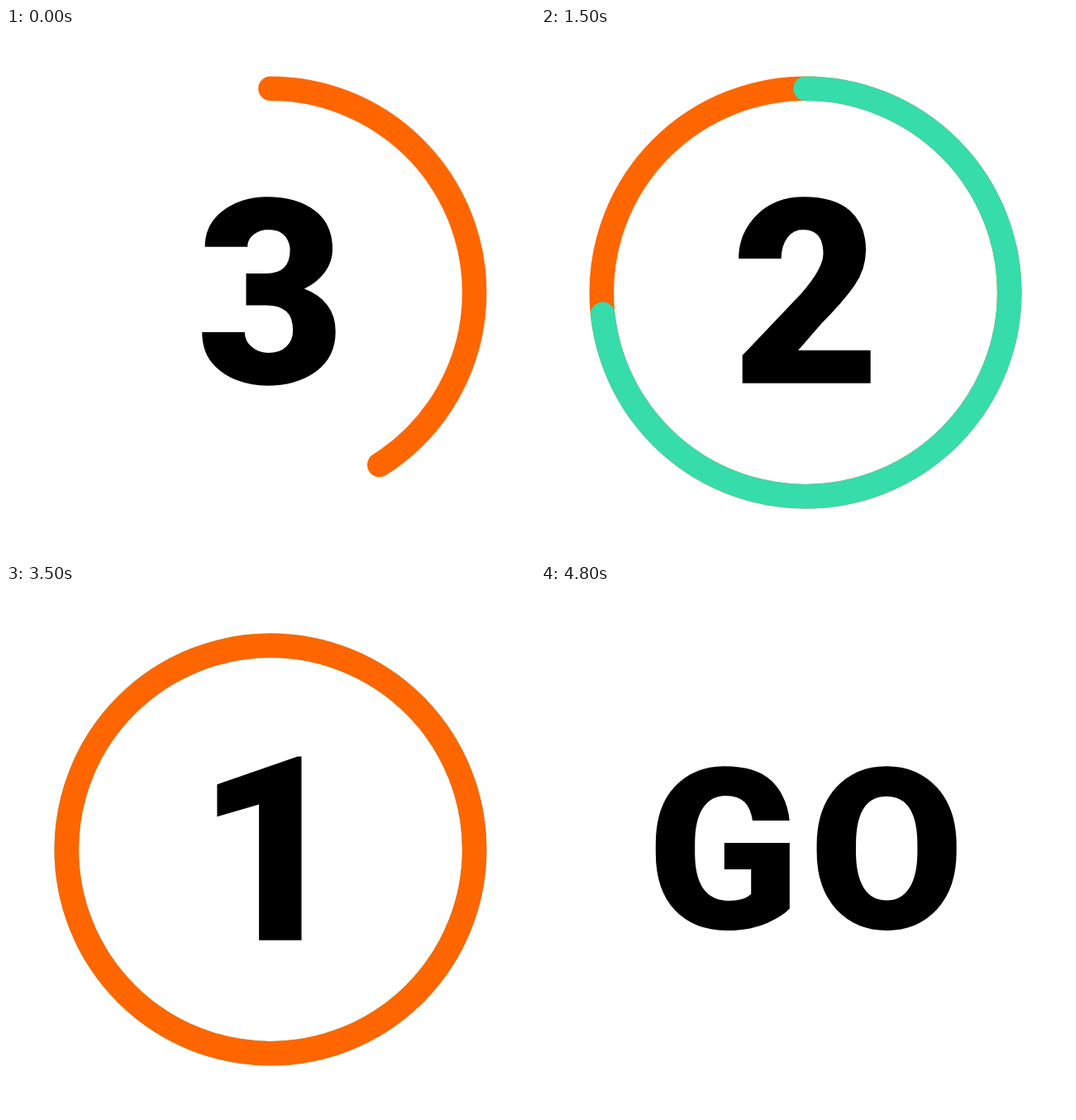
These frames come from a looping animation (640 px wide and 640 px high, 6000 ms). An HTML page:

```html
<!DOCTYPE html>
<html lang="en">
<head>
<meta charset="utf-8">
<title>Countdown</title>
<style>
  html, body { margin: 0; width: 100%; height: 100%; overflow: hidden; background: #fff; }
  svg { display: block; width: 100vw; height: 100vh; }
  circle { fill: none; stroke-width: 29.6; stroke-linecap: round; }
  text { font-family: Roboto, Arial, sans-serif; font-weight: 900; text-anchor: middle; }
</style>
</head>
<body>
<svg viewBox="0 0 640 640">
  <g transform="rotate(-90 320 320)">
    <circle id="under" cx="320" cy="320" r="246.7"/>
    <circle id="sweep" cx="320" cy="320" r="246.7" pathLength="360"/>
  </g>
  <text id="label"></text>
</svg>
<script>
  const LOOP = 6000, STEP = 100, STEPS = 12;
  const ORANGE = '#ff6600', GREEN = '#36dcaa';
  const DIGIT = { x: 320.5, y: 429.7, 'font-size': 312.5, 'letter-spacing': 0 };
  const WORD = { x: 325.5, y: 415.3, 'font-size': 272, 'letter-spacing': 11 };
  const rounds = [
    { text: '3', style: DIGIT, under: 'none', sweep: ORANGE },
    { text: '2', style: DIGIT, under: ORANGE, sweep: GREEN },
    { text: '1', style: DIGIT, under: GREEN, sweep: ORANGE },
    { text: '0', style: DIGIT, under: ORANGE, sweep: GREEN },
    { text: 'GO', style: WORD, under: 'none', sweep: 'none' }
  ];
  const [under, sweep, label] = ['under', 'sweep', 'label'].map(id => document.getElementById(id));

  // Ease-out: the sweep enters already moving and closes on the last step.
  const angle = k => k >= STEPS - 1 ? 360 : 360 * (1 - (0.867 - 0.0557 * k) ** 3.7);

  function set(el, attrs) {
    for (const name in attrs) el.setAttribute(name, attrs[name]);
  }

  function draw(time) {
    const tick = Math.floor((time % LOOP) / STEP);
    const index = Math.min(Math.floor(tick / STEPS), rounds.length - 1);
    const round = rounds[index];
    set(under, { stroke: round.under });
    set(sweep, { stroke: round.sweep, 'stroke-dasharray': angle(tick - index * STEPS) + ' 720' });
    set(label, round.style);
    if (label.textContent !== round.text) label.textContent = round.text;
  }

  const start = performance.now();
  function loop() {
    draw(performance.now() - start);
    requestAnimationFrame(loop);
  }
  loop();
</script>
</body>
</html>
```
